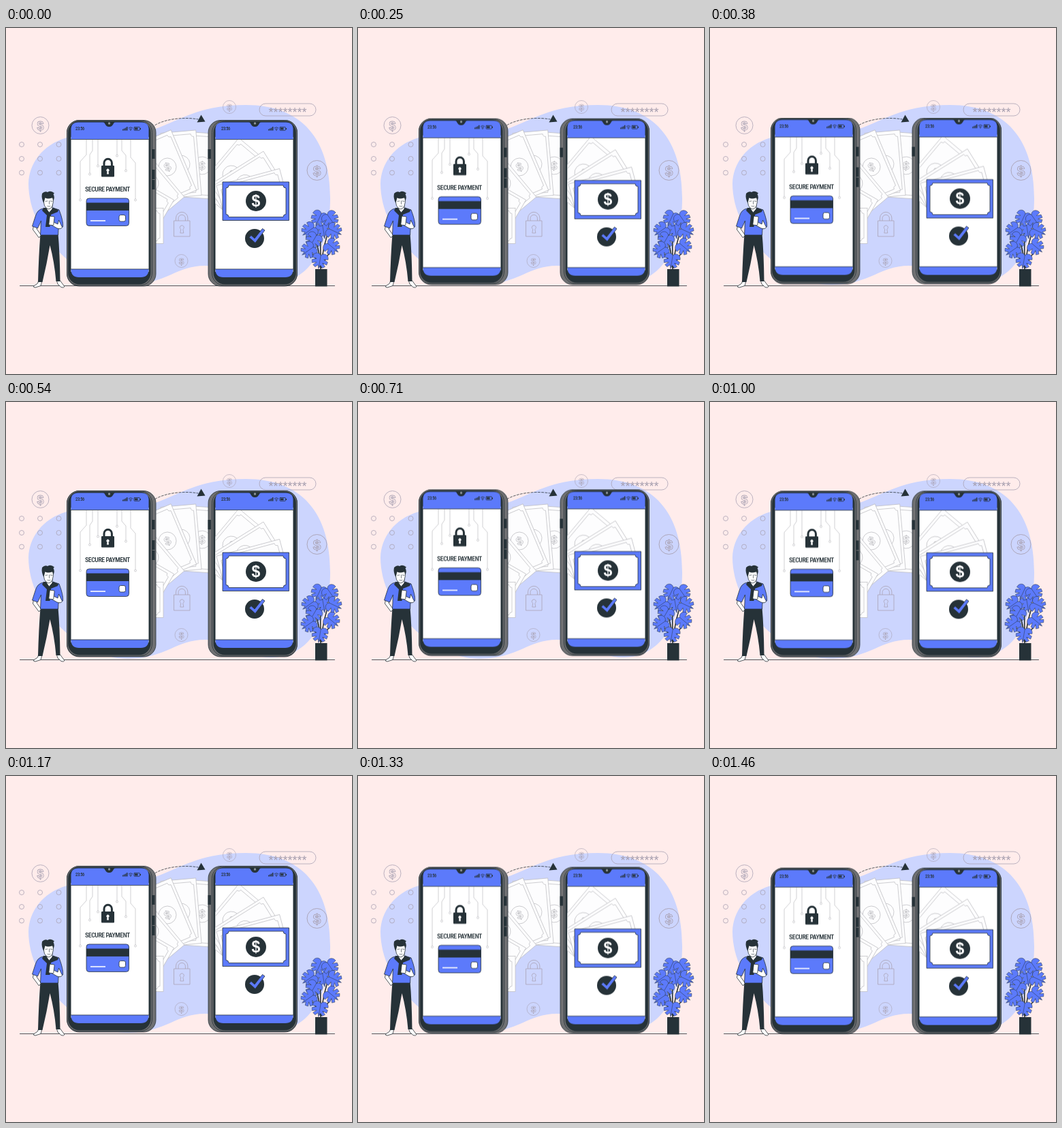
Recreate the animation shown at these times as an HTML page. Size 508x508 px, loop 1.5 s.

```html
<!DOCTYPE html>
<html lang="en">
<head>
<meta charset="utf-8">
<title>Secure payment</title>
<style>
  html, body { margin: 0; width: 100%; height: 100%; overflow: hidden; background: #ffeceb; }
  svg { display: block; width: 100vw; height: 100vh; }
  .float { animation: float 1.5s -4ms infinite steps(18, end); }
  @keyframes float {
    50% { transform: translateY(-7px); }
  }
  .ink { fill: #263238; }
  .blue { fill: #5c7afb; }
  .white { fill: #fff; }
  .edge { stroke: #263238; stroke-width: .8; stroke-linejoin: round; }
  .line { fill: none; stroke: #263238; stroke-width: .8; stroke-linecap: round; stroke-linejoin: round; }
  .faint { fill: none; stroke: #aaa3b4; stroke-width: .8; }
  .pale { fill: none; stroke: #bcbcc0; stroke-width: .7; }
  text { text-anchor: middle; }
  .label {
    font-family: "Roboto Condensed", "Liberation Sans Narrow", Roboto, sans-serif;
    font-stretch: 75%; font-weight: 500; letter-spacing: -.04em;
    text-anchor: start; dominant-baseline: central;
  }
  .dollar { font-family: "Liberation Sans", sans-serif; font-weight: 700; }
</style>
</head>
<body>
<svg viewBox="0 0 508 508">
  <defs>
    <g id="coin">
      <circle r="12.5" class="faint"/>
      <text y="6.5" font-size="18" class="dollar faint">$</text>
    </g>

    <g id="bill">
      <rect x="-26" y="-48" width="52" height="96" class="pale" style="fill:#fdfdfe"/>
      <path class="pale" d="M-18-43H18a4 4 0 0 0 4 4V39a4 4 0 0 0-4 4H-18a4 4 0 0 0-4-4V-39a4 4 0 0 0 4-4Z"/>
      <circle r="13" class="pale"/>
      <text y="6" font-size="17" class="dollar pale">$</text>
    </g>

    <g id="leaf">
      <path class="blue edge" style="stroke-width:.5" d="M0-8C-4-14-13-11-13-3L-6-2L-13 1L-12 6L-5 4L-10 9L-6 12L-2 8L0 14L2 8L6 12L10 9L5 4L12 6L13 1L6-2L13-3C13-11 4-14 0-8Z"/>
      <path class="line" style="stroke-width:.5" d="M0-8V11"/>
    </g>

    <g id="shell">
      <rect x="89.500" y="135.500" width="130.500" height="243.500" rx="18" fill="#6f7072" class="edge"/>
      <rect x="89.500" y="135.500" width="125" height="242.500" rx="18" fill="#6f7072" class="edge"/>
      <rect x="91" y="136.500" width="121.500" height="240" rx="17" class="ink"/>
      <path class="white" d="M95.500 160H209.500V358H95.500Z"/>
      <path class="blue" d="M95.500 163.400V149Q95.500 138.500 106 138.500H199Q209.500 138.500 209.500 149V163.400Z"/>
      <path class="blue" d="M95.500 354H209.500V355Q209 366 198 366H107Q96 366 95.500 355Z"/>
      <path class="line" d="M95.500 163.600H209.500M95.500 354H209.500"/>
      <path class="ink" d="M142 138C146 138 145 145 151.500 145S157 138 161 138Z"/>
      <circle cx="151.500" cy="140" r="1.700" fill="#8d949a"/>
    </g>

    <g id="status">
      <text x="102" y="148" font-size="7" class="label ink" data-width="13">23:56</text>
      <path class="ink" d="M171 148.500h1.400v2H171zM173 147.500h1.400v3H173zM175 146.500h1.400v4H175zM177 145h1.400v5.500H177z"/>
      <path class="line" d="M180.200 146.800Q183 144.300 185.800 146.800M181.500 148.500Q183 147.200 184.500 148.500"/>
      <circle cx="183" cy="150" r=".8" class="ink"/>
      <rect x="188" y="145.500" width="8.500" height="4.800" rx=".8" class="line"/>
      <path class="ink" d="M189 146.500h4.500v2.800H189zM197 147h1v2h-1z"/>
    </g>

    <clipPath id="screen"><path d="M307.500 164H421.500V353.500H307.500Z"/></clipPath>
  </defs>

  <path fill="#ccd5fe" d="M33 228C34 200 52 172 89 161C140 146 180 163 225 146C265 130 290 113 352 113C436 113 476 165 476 250C476 320 445 375 390 375C350 375 335 349 292 349C250 349 235 376 180 377C113 378 33 306 33 228Z"/>

  <g id="dots" class="faint"></g>
  <use href="#coin" x="50.500" y="143"/>
  <use href="#coin" transform="translate(328 116) scale(.76)"/>
  <use href="#coin" transform="translate(456.500 209) scale(1.160)"/>
  <use href="#coin" transform="translate(257.500 342) scale(.76)"/>

  <rect x="372" y="111" width="83" height="18" rx="9" class="faint"/>
  <text x="413.500" y="130" font-size="18" fill="#a59eae" font-family="Liberation Sans, sans-serif">********</text>

  <g class="faint">
    <path d="M246.500 283H270V306H246.500ZM249.500 283V279a8.700 8.700 0 0 1 17.400 0V283M253 283V279.500a5.200 5.200 0 0 1 10.400 0V283"/>
    <path d="M256.800 295.500a3 3 0 1 1 3 0L260.800 301H255.800Z"/>
  </g>

  <use href="#bill" transform="translate(288 202) rotate(4)"/>
  <use href="#bill" transform="translate(257 200) rotate(-5)"/>
  <use href="#bill" transform="translate(237 204) rotate(-23)"/>
  <use href="#bill" transform="translate(211 228) rotate(-40)"/>
  <use href="#bill" transform="translate(192 251) rotate(-60)"/>
  <use href="#bill" transform="translate(183 290.500) rotate(-90)"/>

  <path class="line" stroke-dasharray="3 2.200" d="M219 142.500C235 133 262 130.500 282 134"/>
  <path class="ink" d="M280.500 138.500L286.500 127.500L292.500 137.500Z"/>
  <path class="line" d="M20.500 378.500H482.500"/>

  <g id="person">
    <path class="white edge" d="M48 370L46.500 375L40.500 379Q40 381 43 381L51 378.500L53 371ZM74 370L76 376L81 380.500Q86 382 85.500 379L79.500 371Z"/>
    <path class="ink" d="M50.500 302H76.500Q79 330 79.500 372H73.500Q71 343 64.500 319Q60 346 53.500 373H47Q48 335 50.500 302Z"/>
    <path class="white edge" d="M40.500 290L39.500 296L48.500 308L51.500 304L45 295L46 291Z"/>
    <path class="blue edge" d="M55 265Q46 266 43 277L38.500 291L46.500 294L51.500 283L50.500 304H76.500L77 295L83.500 292Q84.500 284 78 267L69 264Z"/>
    <path class="white edge" d="M82.500 292.500Q81 296 75 294L66 289L68 284L76 288L77.500 282ZM59 260V267L63.500 271L68 266V259Z"/>
    <path class="ink" d="M55 264L59 264L63.500 271L69 264L77 267L76 270L66 274L64.500 292H58L60 275L53 268Z"/>
    <rect x="63.500" y="276.500" width="7" height="13" rx="1.200" class="white edge" transform="rotate(7 67 283)"/>
    <path class="white edge" d="M55.500 249Q54 264 62.500 266Q70 265 69.500 249Z"/>
    <path class="ink" d="M55.500 257Q51.500 250 53 243Q57 239 61 241Q66 238 71 242.500L69.500 244Q72 248 69.500 254L68 249Q61 252 57.500 249Z"/>
    <path class="line" style="stroke-width:.6" d="M58 254.500L61 254M65 254L68 254.500M63.500 254V258.500M61 261.500Q63 262.500 65 261.500"/>
  </g>

  <g id="plant">
    <path class="line" style="stroke-width:1.600" d="M462 356Q462 320 461 285M462 350Q460 318 447 298M463 350Q465 318 477 290M462 352Q454 335 446 328M463 352Q470 335 479 325"/>
    <path class="ink" d="M454 354H471.500V379.500H454Z"/>
    <g id="leaves"></g>
  </g>

  <g class="float">
    <use href="#shell"/>
    <path class="ink" d="M214 178h4.500v14H214zM214 208h4.500v14H214zM214 223h4.500v14H214z"/>
    <use href="#status"/>
    <path class="pale" d="M118 164V186L109 196V251M127 164V180L123 186V213M135 164V201M163 164V186M170 164V180L176 187V208M183 164V190L190 198V251"/>
    <g class="pale">
      <circle cx="109" cy="252.500" r="1.500"/><circle cx="123" cy="214.500" r="1.500"/>
      <circle cx="135" cy="202.500" r="1.500"/><circle cx="163" cy="187.500" r="1.500"/>
      <circle cx="176" cy="209.500" r="1.500"/><circle cx="190" cy="252.500" r="1.500"/>
    </g>
    <path class="line" style="stroke-width:3" d="M144 204V198a5.700 5.700 0 0 1 11.400 0V204"/>
    <rect x="140" y="202" width="19" height="16.500" rx="1" class="ink"/>
    <path class="white" d="M148.500 210.500a2 2 0 1 1 2 0L151 214.500H148Z"/>
    <text x="116" y="236" font-size="9" class="label ink" data-width="66">SECURE PAYMENT</text>
    <rect x="118" y="250" width="62.500" height="40.500" rx="4" class="blue edge"/>
    <path class="ink" d="M118 256.500h62.500v11.500H118z"/>
    <path d="M124 283H146" stroke="#fff" stroke-width="1.600"/>
    <rect x="166" y="274.500" width="9.500" height="9.500" rx="2.500" class="white edge"/>
  </g>

  <g class="float">
    <use href="#shell" transform="matrix(-1 0 0 1 517 0)"/>
    <path class="ink" d="M296.500 178h4.500v14h-4.500z"/>
    <use href="#status" x="214"/>
    <g clip-path="url(#screen)">
      <use href="#bill" transform="translate(331 215) rotate(40)"/>
      <use href="#bill" transform="translate(351 228.500) rotate(58)"/>
      <use href="#bill" transform="translate(362 244) rotate(75)"/>
    </g>
    <rect x="318" y="226" width="97.500" height="56.500" class="blue edge"/>
    <path class="white edge" d="M327 231H407a4 4 0 0 0 4 4V273.500a4 4 0 0 0-4 4H327a4 4 0 0 0-4-4V235a4 4 0 0 0 4-4Z"/>
    <circle cx="367" cy="254" r="15" class="ink"/>
    <text x="367" y="262" font-size="23" class="dollar white">$</text>
    <circle cx="365" cy="309" r="14" class="ink"/>
    <path class="blue edge" d="M357 307.500L360 304.500L365 309L376.500 294.500L380 297L366 315.500Z"/>
  </g>
</svg>
<script>
  const NS = "http://www.w3.org/2000/svg";

  function add(parent, tag, attrs) {
    const node = document.createElementNS(NS, tag);
    for (const key in attrs) node.setAttribute(key, attrs[key]);
    document.getElementById(parent).append(node);
  }

  for (const cx of [23, 50, 77.5])
    for (const cy of [171, 192, 212.5]) add("dots", "circle", { cx, cy, r: 3.5 });

  // x, y, angle
  const leaves = [
    [466, 297, -10], [460, 279, 25], [476, 280, -35], [446, 297, 55], [481, 298, -65],
    [452, 311, 30], [445, 326, 55], [478, 321, -50], [461, 341, 10],
  ];
  for (const [x, y, angle] of leaves)
    add("leaves", "use", { href: "#leaf", transform: `translate(${x} ${y}) rotate(${angle}) scale(.9)` });

  // Pick the type size that suits the available condensed face.
  for (const label of document.querySelectorAll(".label")) {
    const size = +label.getAttribute("font-size");
    const width = label.getComputedTextLength();
    if (width) label.setAttribute("font-size", size * label.dataset.width / width);
  }
</script>
</body>
</html>
```
